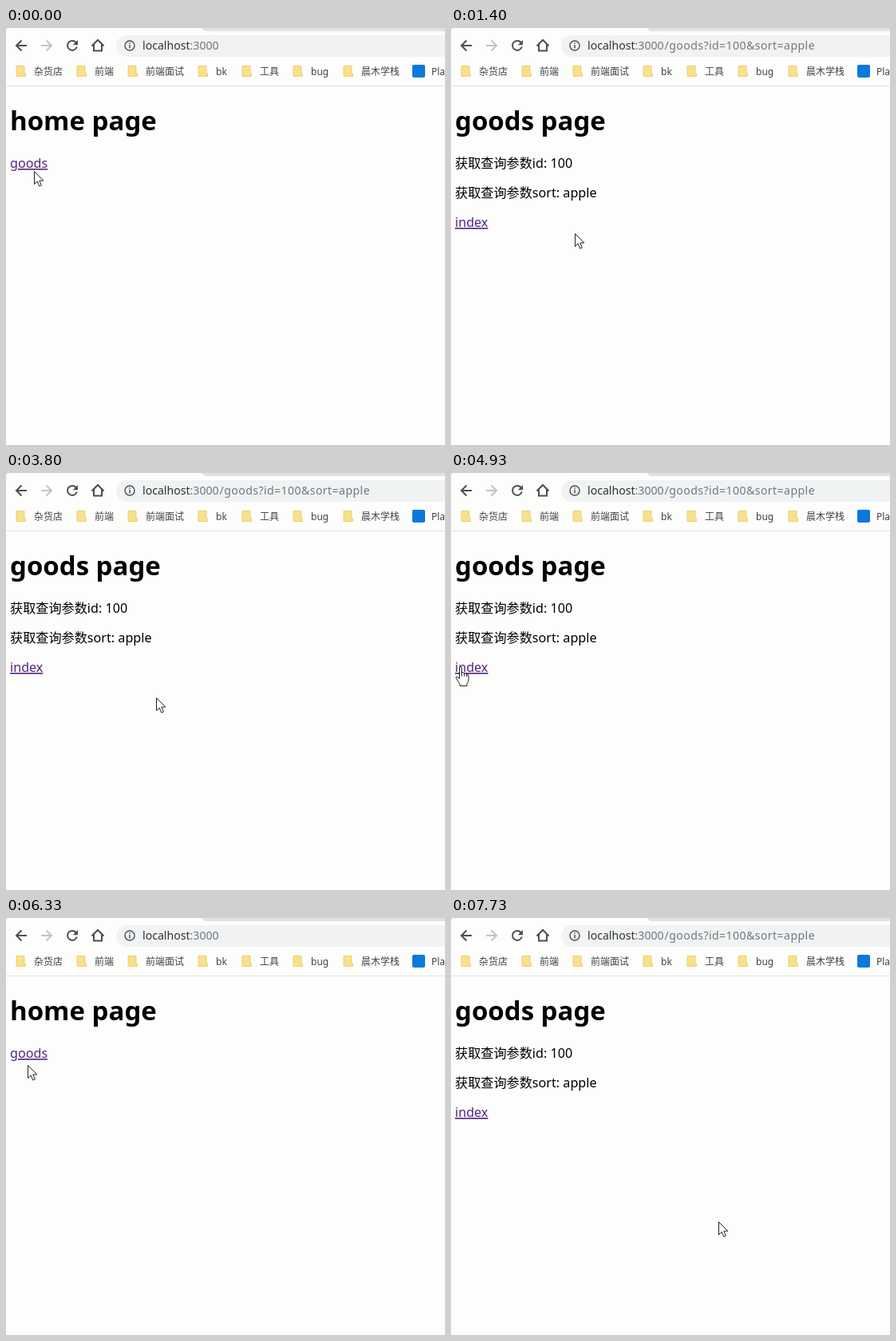
These frames come from a looping animation (550x522 px, 7860 ms). An HTML page:

```html
<!DOCTYPE html>
<html lang="zh-CN">
<head>
<meta charset="utf-8">
<title>Query parameters</title>
<style>
  html, body { margin: 0; width: 100%; height: 100%; overflow: hidden; background: #fdfdfc; }
  svg { display: block; font: 16.15px "Noto Sans", "Noto Sans CJK SC", "Noto Sans CJK", sans-serif; }
  .title { font-size: 33px; font-weight: 700; }
  .link { fill: #55247f; text-decoration: underline; }
  .url { font-size: 14.1px; fill: #303234; }
  .dim { fill: #74777a; }
  .path { letter-spacing: .42px; }
  #bookmarks { font-size: 12px; fill: #3f4144; }
  .icon { fill: none; stroke: #4c4f52; stroke-width: 2; }
  .pointer { fill: #fff; stroke: #222; stroke-width: 1; stroke-linejoin: round; }
</style>
</head>
<body>
<svg width="550" height="522" viewBox="0 0 550 522">
  <path d="M246 0Q247 4 252 4H550V0ZM0 0H3Q0 1 0 4Z" fill="#dee1e5"/>
  <rect x="138" y="9" width="440" height="27" rx="13.5" fill="#f0f2f3"/>
  <path d="M0 72.5H550" stroke="#e1e2e4"/>

  <g class="icon">
    <path d="M26 22H13.5M19.5 15.5L13 22L19.5 28.5"/>
    <path d="M44 22H56.5M50.5 15.5L57 22L50.5 28.5" stroke="#c2c3c5"/>
    <path d="M87.6 18A6 6 0 1 0 88.8 23.5"/>
    <path d="M90 15V21.2H83.8Z" fill="#4c4f52" stroke="none"/>
    <path d="M107.5 22.5L115 15L122.5 22.5M110 20.5V28.5H120V20.5"/>
    <circle cx="155" cy="22" r="6" stroke-width="1.4"/>
    <path d="M155 21V25.5M155 18.3V19.8" stroke-width="1.5"/>
  </g>

  <text class="url" x="171" y="27">localhost<tspan class="dim">:3000</tspan></text>
  <g id="bookmarks"></g>

  <g id="home">
    <text class="title" x="5" y="128">home page</text>
    <text class="link" x="5" y="175">goods</text>
  </g>
  <g id="goods">
    <text class="url dim path" x="267.5" y="27">/goods?id=100&amp;sort=apple</text>
    <text class="title" x="5" y="128">goods page</text>
    <text x="5" y="175">获取查询参数id: 100</text>
    <text x="5" y="212">获取查询参数sort: apple</text>
    <text class="link" x="5" y="249">index</text>
  </g>

  <g id="cursor">
    <path id="arrow" class="pointer" d="M.5 .5V16.5L4.2 13L6.8 19L9.4 17.9L6.8 12H11.8Z"/>
    <path id="hand" class="pointer" d="M-1.5 14V2Q-1.5 .5 0 .5T1.5 2V8Q4.3 6.8 4.6 9Q7 8 7.4 10Q10 9.4 10 12V17Q10 20 8 21.5V24.5H-1V22L-5.3 15.5Q-6.3 13.8 -5 13.2Q-3.7 12.6 -1.5 15.5ZM1.5 8V12.5M4.6 9V12.5M7.4 10V13"/>
    <path id="beam" d="M-3 -7.5H-1L0 -6.5L1 -7.5H3M0 -6.5V6.5M-3 7.5H-1L0 6.5L1 7.5H3" fill="none" stroke="#222"/>
  </g>
</svg>
<script>
const $ = id => document.getElementById(id);
const show = (id, on) => $(id).setAttribute('display', on ? 'inline' : 'none');

const bookmarks = [[35, '杂货店'], [111, '前端'], [175, '前端面试'], [263, 'bk'],
  [318, '工具'], [382, 'bug'], [445, '晨木学栈'], [533, 'Plan']];
$('bookmarks').innerHTML = bookmarks.map(([x, label], i) => {
  const icon = i === bookmarks.length - 1
    ? `<rect x="${x - 24}" y="46" width="16" height="16" rx="2" fill="#0b78dc"/>`
    : `<path d="M${x - 22} 47.5H${x - 12}V57H${x - 10.5}V60.5H${x - 22}Z" fill="#fbe08a" stroke="#e8c766" stroke-width=".8"/>`;
  return `${icon}<text x="${x}" y="59">${label}</text>`;
}).join('');

const LOOP = 7860;
// Pointer hot spot: time, x, y
const track = [
  [0, 35, 179], [130, 35, 179], [600, 33, 170], [930, 33, 170], [1600, 188, 281],
  [4000, 188, 281], [4730, 12, 244], [4930, 12, 242], [5930, 12, 242],
  [6130, 20, 212], [6330, 27, 184], [6530, 27, 171], [6930, 27, 171],
  [7400, 335, 380], [LOOP, 335, 380]
];
// Hover areas: left, top, right, bottom, pointer shape
const zones = {
  home: [[5, 95, 186, 138, 'beam'], [5, 158, 53, 178, 'hand']],
  goods: [[5, 95, 194, 138, 'beam'], [5, 158, 152, 180, 'beam'],
    [5, 195, 182, 217, 'beam'], [5, 232, 47, 254, 'hand']]
};

function pointerAt(t) {
  const i = track.findIndex(key => key[0] > t);
  const [t0, x0, y0] = track[i - 1], [t1, x1, y1] = track[i];
  const p = (t - t0) / (t1 - t0), e = p * p * (3 - 2 * p);
  return [Math.round(x0 + (x1 - x0) * e), Math.round(y0 + (y1 - y0) * e)];
}

function render(now) {
  const time = now % LOOP, rest = time % 200;
  const t = time - rest + (rest >= 130 ? 130 : 0);
  const page = (t >= 930 && t < 5530) || t >= 6930 ? 'goods' : 'home';
  const [x, y] = pointerAt(t);
  const zone = zones[page].find(([l, top, r, b]) => x >= l && x <= r && y >= top && y <= b);
  const shape = zone ? zone[4] : 'arrow';
  for (const id of ['home', 'goods']) show(id, id === page);
  for (const id of ['arrow', 'hand', 'beam']) show(id, id === shape);
  $('cursor').setAttribute('transform', `translate(${x} ${y})`);
}

const start = performance.now();
(function tick() {
  render(performance.now() - start);
  requestAnimationFrame(tick);
})();
</script>
</body>
</html>
```
